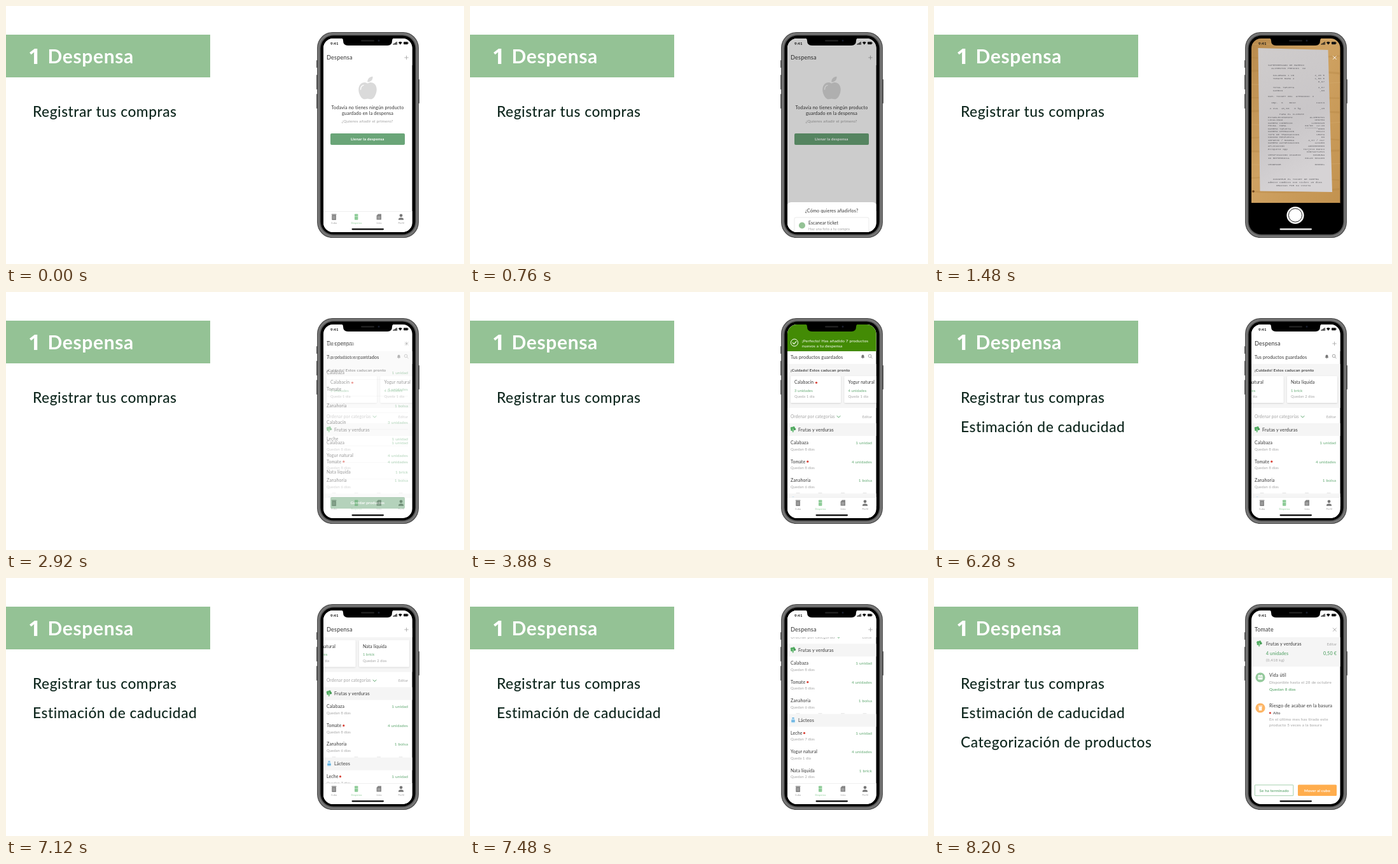
Animation of 720 by 405 pixels, one loop 8720 ms. Source, as an HTML page:

```html
<!DOCTYPE html>
<html lang="es">
<head>
<meta charset="utf-8">
<title>Despensa</title>
<style>
html, body { margin: 0; width: 100%; height: 100%; overflow: hidden; background: #fff; }
svg { display: block; width: 100%; height: 100%; }
text { font-family: Lato, sans-serif; letter-spacing: .022em; white-space: pre; }
.one { font-family: "Open Sans", sans-serif; letter-spacing: 0; }
.mono { font-family: "Liberation Mono", monospace; letter-spacing: 0; }
</style>
</head>
<body>
<svg id="stage" viewBox="0 0 720 405"></svg>
<script>
const LOOP = 8720, STEP = 40;
const INK = '#333', GREY = '#a3a3a3', GREEN = '#5fa870', PALE = '#f5f5f5', RED = '#d9453a';

// Markup helpers
const text = (x, y, size, str, fill = INK, extra = '') =>
  `<text x="${x}" y="${y}" font-size="${size}" fill="${fill}" ${extra}>${str}</text>`;
const rect = (x, y, w, h, fill, r = 0, extra = '') =>
  `<rect x="${x}" y="${y}" width="${w}" height="${h}" rx="${r}" fill="${fill}" ${extra}/>`;
const dot = (x, y, r, fill, extra = '') =>
  `<circle cx="${x}" cy="${y}" r="${r}" fill="${fill}" ${extra}/>`;
const path = (d, fill, extra = '') => `<path d="${d}" fill="${fill}" ${extra}/>`;
const line = (d, color, w = .8) =>
  path(d, 'none', `stroke="${color}" stroke-width="${w}" stroke-linecap="round" stroke-linejoin="round"`);
const group = (id, body, extra = '') => `<g id="${id}" ${extra}>${body}</g>`;
const END = 'text-anchor="end"', MID = 'text-anchor="middle"';
const BOLD = 'font-weight="700"', SEMI = 'font-weight="600"', MEDIUM = 'font-weight="500"';

// Small icons
const cross = color => line('M627.3 78.6l5 5m0-5l-5 5', color, .9);
const broccoli = (x, y) => `<g transform="translate(${x} ${y})">` +
  path('M-1.5 0h3.2l-1.2 4.6h-1.8z', '#7cc487') +
  dot(-2.2, -1.8, 2.1, '#54ad63') + dot(.8, -2.6, 2.1, '#54ad63') + dot(-2.3, .8, 1.6, '#54ad63') +
  dot(2.4, -.4, 1.8, '#479b57') + '</g>';
const milk = (x, y) => `<g transform="translate(${x} ${y})">` +
  rect(-1.6, -4.2, 3.2, 1.6, '#5aa9dc', .4) + path('M-1.4-2.6h2.8l1.3 2v4.6h-5.4v-4.6z', '#a8d8f3') +
  rect(-2.7, .4, 5.4, 2, '#5aa9dc') + '</g>';

const status = text(510, 61, 6, '9:41', '#111', BOLD) +
  [0, 1, 2, 3].map(i => rect(608.5 + i * 1.7, 59.2 - i, 1.2, 1.6 + i, '#111')).join('') +
  path('M616.8 57.3q3-2.6 6 0l-3 3.5z', '#111') +
  rect(625, 56.2, 6.8, 4, '#111', 1) + rect(632.1, 57.4, .6, 1.6, '#111');
const homeBar = color => rect(543.5, 349.2, 50.5, 2.2, color, 1.1);

const tabs = rect(498, 322, 142, 34, '#fff') + rect(498, 322, 142, .6, '#e6e6e6') +
  rect(512.2, 328, 6.8, 8, '#858585', .8) + rect(511.7, 326.6, 7.8, 1.2, '#858585', .4) +
  line('M514.4 330v4m2.4-4v4', '#d5d5d5', .6) +
  rect(548, 326.5, 5.4, 9.3, '#8ccb96', .7) + line('M548.3 330.3h4.8', '#fff', .5) +
  path('M585 326.5h5v9h-7.4v-6.6z', '#858585') + line('M584.4 331h3.8m-3.8 2h3.8', '#ddd', .6) +
  dot(621, 328.8, 2.4, '#777') + path('M617 335.8v-1q0-2.6 4-2.6t4 2.6v1z', '#777') +
  [['Cubo', 515.6], ['Despensa', 551], ['Lista', 586.5], ['Perfil', 621.2]].map(([s, x], i) =>
    text(x, 341.6, 3.8, s, i == 1 ? '#8ccb96' : '#999', MID)).join('') + homeBar('#000');

const head = rect(498, 50, 142, 43, '#fff') + status + text(504, 84, 9.1, 'Despensa') +
  line('M629.5 78.2v5.6m-2.8-2.8h5.6', GREY, .8);

const empty = rect(498, 50, 142, 306, '#fff') + head +
  path('M568.5 121.5c-3-2.2-7.5-2.2-10.6.6c-5.2 4.8-4.3 13.6-.6 19.6c3 5 6.4 5.4 11.2 3.8' +
    'c4.8 1.6 8.2 1.2 11.2-3.8c3.7-6 4.6-14.8-.6-19.6c-3.1-2.8-7.6-2.8-10.6-.6z', '#dadada') +
  path('M568.2 119.5c0-5 3.2-8.4 8.4-8.7c.2 5-3 8.7-8.4 8.7z', '#dadada') +
  line('M557.5 131c0-3.5 1.5-5.8 4.5-6.6', '#fff', 1.4) +
  text(568.5, 162, 7.2, 'Todavía no tienes ningún producto', INK, MID) +
  text(568.5, 171.2, 7.2, 'guardado en la despensa', INK, MID) +
  text(568, 183, 6.5, '¿Quieres añadir el primero?', GREY, MID) +
  rect(510, 200, 117, 18, '#6aa578', 2) + text(568.3, 211.2, 6.2, 'Llenar la despensa', '#fff', MID + BOLD) + tabs;

const option = (y, title, note) => rect(510, y, 117, 25, '#fff', 2, 'stroke="#dcdcdc" stroke-width=".6"') +
  dot(522, y + 12.5, 5, '#94c295') + text(532, y + 11, 6.8, title) + text(532, y + 19.5, 5.6, note, GREY);
const sheet = rect(498, 50, 142, 306, '#000', 0, 'id="dim"') + group('sheet',
  rect(498, 258, 142, 110, '#fff', 7) + text(568.5, 274, 7.2, '¿Cómo quieres añadirlos?', INK, MID) +
  option(282, 'Escanear ticket', 'Haz una foto a tu compra') +
  option(312, 'Añadir a mano', 'Escribe cada producto') + homeBar('#000'));

// Photographed receipt: [y, left text, right text]
const ticket = [
  [94, 'SUPERMERCADO DE BARRIO'], [99, '  ALIMENTOS FRESCOS  N2'],
  [110, '   CALABAZA 1 UD', '2,25 €'], [115, '   TOMATE RAMA 4', '1,50 €'], [120, '', '0,97'],
  [129, '   TOTAL TARJETA', '4,87'], [134, '   CAMBIO', ',00'],
  [143, 'NUM. TICKET 001  ATENDIDO: 3'], [153, '  Imp.  %    Base', 'Cuota'], [162, ' 4 IVA  10,00   0 kg', ',45'],
  [171, '       PARA EL CLIENTE'], [175.5, 'ESTABLECIMIENTO', 'ALIMENTOS'], [180, 'LOCALIDAD', 'CENTRO'],
  [184.5, 'NUMERO COMERCIO', '12000345'], [189, 'FECHA  HORA', '00/00  12:30'], [193.5, 'NUMERO TARJETA', '********0000'],
  [198, 'NUMERO OPERACION', '00123'], [202.5, 'TIPO DE TRANSACCION', 'VENTA'], [207, 'CODIGO RESPUESTA', '00'],
  [211.5, 'IMPORTE / MONEDA', '4,87 / eur'], [216, 'NUMERO AUTORIZACION', '123456'], [220.5, 'APLICACION', 'A000000000'],
  [225.5, 'Etiqueta app', 'Tarjeta Banco'], [230, '', 'CONTACTLESS'], [235, 'VERIFICACION USUARIO', 'NINGUNA'],
  [239.5, 'ID REFERENCIA', '00120 003400'], [250, 'VENDEDOR', '000001'], [273, '   CONSERVE EL TICKET DE COMPRA'],
  [278, 'Admite cambios con ticket 15 dias'], [282.5, '     GRACIAS POR SU VISITA']
];
const grain = Array.from({ length: 12 }, (_, i) => {
  const y = 60 + i * 21, bend = 4 * Math.sin(i * 2.4);
  return line(`M498 ${y}q70 ${bend} 142 ${-bend}`, i % 3 ? '#b1823f' : '#dfba7f', 1 + i % 3);
}).join('');
const photo = rect(498, 50, 142, 260, 'url(#wood)') + `<g opacity=".3">${grain}</g>` +
  dot(502, 291, 1.8, '#6d431c') +
  path('M509.5 66L619.5 69L626 292L512.5 290.5z', 'url(#paper)') +
  ticket.map(([y, a, b]) => text(525, y, 4.3, a, '#67666a', 'class="mono"') +
    (b ? text(614, y, 4.3, b, '#67666a', 'class="mono"' + END) : '')).join('') + status;
const camera = photo + cross('#fff') + rect(498, 309, 142, 47, '#000') + dot(568, 328.5, 13.6, '#fff') +
  dot(568, 328.5, 10.6, 'none', 'stroke="#222" stroke-width="1"') + homeBar('#fff');
const reading = photo + rect(498, 50, 142, 306, '#000', 0, 'opacity=".55"') +
  dot(568.5, 190, 12, 'none', 'stroke="#fff" stroke-opacity=".35" stroke-width="2.4"') +
  line('M568.5 178a12 12 0 0 1 12 12', '#fff', 2.4) +
  text(568.5, 217, 7.2, 'Leyendo tu ticket…', '#fff', MID) + homeBar('#fff');

const bought = [['Calabaza', '1 unidad'], ['Tomate', '4 unidades'], ['Zanahoria', '1 bolsa'], ['Calabacín', '3 unidades'],
  ['Leche', '1 unidad'], ['Yogur natural', '4 unidades'], ['Nata líquida', '1 brick']];
const review = rect(498, 50, 142, 306, '#fff') + status + text(504, 84, 9.1, 'Tu compra') + cross(GREY) +
  rect(498, 93, 142, 20, PALE) + text(504, 105.3, 7.2, '7 productos encontrados') +
  bought.map(([n, q], i) => text(504, 129 + i * 26, 6.9, n) + text(632, 129 + i * 26, 6.4, q, GREEN, END) +
    rect(504, 137 + i * 26, 128, .5, '#e8e8e8')).join('') +
  rect(510, 322, 117, 18, '#6aa578', 2) + text(568.3, 333.2, 6.2, 'Guardar productos', '#fff', MID + BOLD) + homeBar('#000');

// Pantry list
const card = (x, name, qty, days, warn) => rect(x, 132, 79, 42, '#fff', 1.5, 'filter="url(#soft)"') +
  text(x + 6, 144.3, 6.8, name) + (warn ? dot(x + 40.5, 142.3, 1.6, RED) : '') +
  text(x + 6, 157, 5.8, qty, GREEN) + text(x + 6, 166.2, 5.7, days, GREY);
const item = (y, name, qty, days, warnX) => text(504, y, 6.9, name) + text(632, y, 6.45, qty, GREEN, END) +
  text(504, y + 9.6, 5.75, days, GREY) + (warnX ? dot(warnX, y - 2.3, 1.6, RED) : '');
const section = (y, name, icon) => rect(498, y, 142, 20, PALE) + icon(508, y + 9.6) + text(516, y + 12.5, 7.1, name);
const list = group('list',
  text(504, 105, 7.2, 'Tus productos guardados') +
  path('M614.7 103.2l.8-1.3v-1.4a2 2 0 0 1 4 0v1.4l.8 1.3z', '#777') + dot(617.5, 103.7, .7, '#777') +
  dot(628.6, 100.4, 2.3, 'none', 'stroke="#888" stroke-width=".8"') + line('M630.4 102.2l1.8 1.8', '#888') +
  rect(498, 113, 142, 69, PALE) + text(504, 125, 6.4, '¡Cuidado! Estos caducan pronto', INK, SEMI) +
  group('cards', card(504, 'Calabacín', '3 unidades', 'Queda 1 día', true) +
    card(588.5, 'Yogur natural', '4 unidades', 'Queda 1 día') + card(673, 'Nata líquida', '1 brick', 'Quedan 2 días')) +
  text(504, 198, 6.6, 'Ordenar por categorías', GREY) + line('M577 194.5l2.5 2.7l2.5-2.7', GREEN, 1) +
  text(632, 198, 5.6, 'Editar', GREY, END) +
  section(206, 'Frutas y verduras', broccoli) +
  item(239, 'Calabaza', '1 unidad', 'Quedan 8 días') +
  item(268.5, 'Tomate', '4 unidades', 'Quedan 8 días', 530.8) +
  item(298, 'Zanahoria', '1 bolsa', 'Quedan 6 días') +
  [515.5, 550.5, 586, 620.5].map(x => line(`M${x - 2.5} 315.6h5`, '#c9c9c9', .6)).join('') +
  section(316.3, 'Lácteos', milk) +
  item(348.5, 'Leche', '1 unidad', 'Quedan 7 días', 525.5) +
  item(378, 'Yogur natural', '4 unidades', 'Queda 1 día') +
  item(407.5, 'Nata líquida', '1 brick', 'Quedan 2 días') +
  section(426, 'Cereales', broccoli));
const banner = group('banner', rect(498, 50, 142, 43, '#438b05') +
  dot(510, 79.5, 5.6, 'none', 'stroke="#fff" stroke-width="1"') + line('M507.3 79.7l2 2l3.6-4', '#fff', 1.1) +
  text(522, 78.5, 6.45, '¡Perfecto! Has añadido 7 productos', '#fff') +
  text(522, 86.5, 6.45, 'nuevos a tu despensa', '#fff'));
const pantry = rect(498, 50, 142, 306, '#fff') + list + head + tabs + banner;

const detail = rect(498, 50, 142, 306, '#fff') + status + text(504, 84, 8.9, 'Tomate') + cross(GREY) +
  rect(498, 93, 142, 46, PALE) + broccoli(511.5, 103) + text(522, 106, 7.1, 'Frutas y verduras') +
  text(633, 106, 5.6, 'Editar', GREY, END) + text(522, 120.7, 7, '4 unidades', GREEN, SEMI) +
  text(633, 120.7, 7.2, '0,50 €', GREEN, END + SEMI) + text(522, 131.3, 6.3, '(0,418 kg)', GREY) +
  dot(513, 156, 7.6, '#94c99c') + rect(509.4, 152.8, 7.2, 6.6, '#fff', .8) + rect(510.2, 155, 5.6, 1, '#94c99c') +
  line('M511 152v1m4-1v1', '#fff') +
  text(527, 155.3, 7, 'Vida útil') + text(527, 166, 6.35, 'Disponible hasta el 28 de octubre', GREY) +
  text(527, 176.5, 6.3, 'Quedan 8 días', GREEN, SEMI) +
  dot(513, 204, 7.6, '#fdb565') + path('M510.4 202h5.2l-.5 6h-4.2z', '#fff') + rect(509.8, 200.4, 6.4, 1, '#fff') +
  text(527, 203.3, 7.35, 'Riesgo de acabar en la basura') + dot(528.4, 211.8, 1.6, RED) + text(533, 214, 6, 'Alto') +
  text(527, 224.3, 6.35, 'En el último mes has tirado este', GREY) +
  text(527, 232.6, 6.35, 'producto 5 veces a la basura', GREY) +
  rect(504.4, 324.9, 60.4, 16.8, '#fff', .5, 'stroke="#8fc49a" stroke-width=".8"') +
  text(534.8, 335.5, 6.2, 'Se ha terminado', GREEN, MID + SEMI) +
  rect(572, 324.5, 61, 17.5, '#ffad4d', 1.5) + text(602.5, 335.5, 6.2, 'Mover al cubo', '#fff', MID + BOLD) + homeBar('#000');

const screens = { empty, sheetView: sheet, camera, reading, review, pantry, detail };
const sideKey = (x, y, h) => rect(x, y, 2, h, '#5a5a5a', .8);
const bullet = (id, y, str) => group(id, text(42, y, 22.8, str, '#10281f', MEDIUM));

const stage = document.getElementById('stage');
stage.innerHTML = `<defs>
  <clipPath id="glass">${rect(499, 51, 139.5, 304, '#000', 15)}</clipPath>
  <linearGradient id="wood" x2="1" y2="1"><stop stop-color="#b88a4c"/><stop offset=".45" stop-color="#cfa262"/><stop offset="1" stop-color="#c2924f"/></linearGradient>
  <linearGradient id="paper" x2=".3" y2="1"><stop stop-color="#cfcccc"/><stop offset=".6" stop-color="#c9c6c8"/><stop offset="1" stop-color="#d6d3d5"/></linearGradient>
  <filter id="soft" x="-10%" y="-10%" width="120%" height="130%"><feDropShadow dx="0" dy=".8" stdDeviation=".8" flood-opacity=".15"/></filter>
</defs>` + rect(0, 0, 720, 405, '#fff') + rect(0, 45, 321, 67, '#94c295') +
  text(35, 91, 34.5, '1', '#fff', 'class="one"' + BOLD) + text(65.5, 89.5, 30, 'Despensa', '#fff', BOLD) +
  bullet('b1', 174.3, 'Registrar tus compras') + bullet('b2', 220.3, 'Estimación de caducidad') +
  bullet('b3', 266.3, 'Categorización de productos') +
  sideKey(488, 85, 12) + sideKey(488, 108, 23) + sideKey(488, 138, 23) + sideKey(648, 115, 38) +
  rect(489.7, 41.7, 158.6, 321.8, '#777', 24, 'stroke="#4a4a4a" stroke-width="1.2"') +
  rect(493, 45, 152, 315.2, '#555', 21.5) + rect(494.6, 46.6, 148.8, 312, '#000', 20) +
  `<g clip-path="url(#glass)">${Object.entries(screens).map(([id, s]) => group(id, s)).join('')}</g>` +
  path('M525 50q5 0 5 4.5q0 7.5 7.5 7.5h62q7.5 0 7.5-7.5q0-4.5 5-4.5z', '#000') +
  rect(558, 53.4, 21, 2, '#262626', 1) + dot(586, 54.4, 1.4, '#1c2030');

const el = id => document.getElementById(id);
const show = (id, on) => el(id).setAttribute('opacity', +on);
const move = (id, x, y) => el(id).setAttribute('transform', `translate(${x} ${y})`);

// Cubic-bezier(.42, 0, .58, 1)
function ease(x) {
  if (x <= 0 || x >= 1) return Math.min(1, Math.max(0, x));
  let lo = 0, hi = 1, s;
  for (let i = 0; i < 20; i++) {
    s = (lo + hi) / 2;
    const at = 3 * s * (1 - s) * (.42 * (1 - s) + .58 * s) + s * s * s;
    if (at < x) lo = s; else hi = s;
  }
  return s * s * (3 - 2 * s);
}

function draw(now) {
  const t = Math.floor(now % LOOP / STEP) * STEP;
  const within = (a, b) => t >= a && t < b;
  const run = (a, b) => ease((t - a) / (b - a));
  show('empty', t < 1480);
  show('sheetView', within(600, 1480));
  show('camera', within(1480, 1960));
  show('reading', within(1960, 2440));
  show('review', within(2440, 2960));
  show('pantry', within(2920, 8200) ? run(2880, 2960) : 0);
  show('detail', t >= 8200);

  const up = run(560, 960);
  show('dim', .4 * up);
  move('sheet', 0, 100 * (1 - up));
  move('banner', 0, -44 * (1 - run(3520, 3880) + run(4360, 4840)));
  move('cards', -118 * run(5320, 6280), 0);
  move('list', 0, -118 * run(6760, 7720));
  show('b2', run(6200, 6280));
  show('b3', run(7640, 7720));
}

const start = performance.now();
function tick() {
  draw(performance.now() - start);
  requestAnimationFrame(tick);
}
tick();
</script>
</body>
</html>
```
